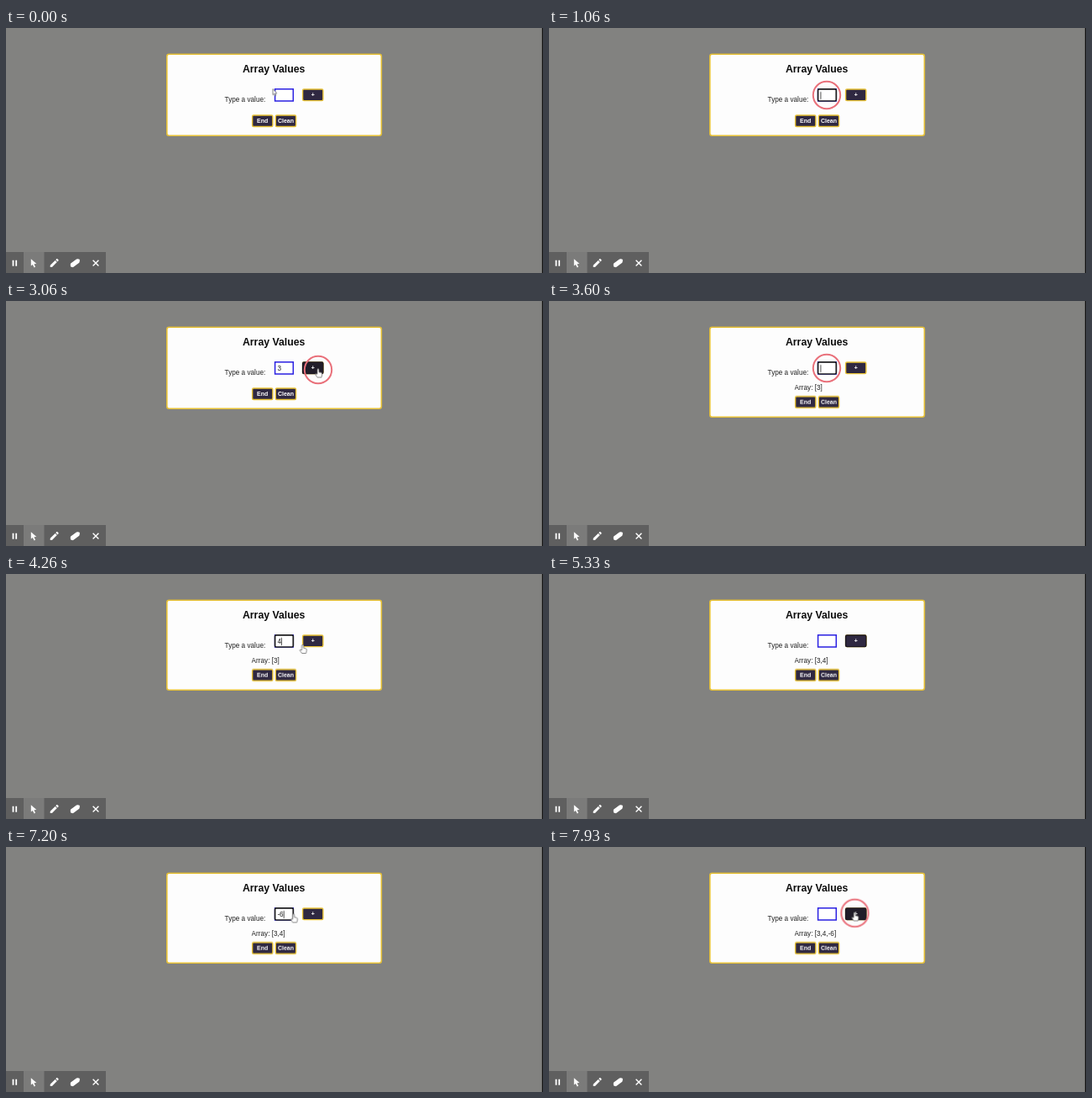
An HTML page that plays this animation: 640 px wide and 292 px high, repeating every 8 s.

```html
<!DOCTYPE html>
<html lang="en">
<head>
<meta charset="utf-8">
<title>Array Values</title>
<style>
  html, body { margin: 0; width: 100%; height: 100%; overflow: hidden; background: #828280; }
  svg { display: block; width: 640px; height: 292px; font: 8.2px "Liberation Sans", Arial, sans-serif; fill: #222; }
  .title { font-size: 12.3px; font-weight: bold; fill: #0c0c0c; text-anchor: middle; }
  .panel { fill: #fdfdfd; stroke: #e7c136; stroke-width: 1.6; height: 97px; }
  .btn rect { fill: #2f2841; stroke: #e7c136; stroke-width: 1.4; }
  .btn text { font-size: 7px; font-weight: bold; fill: #fff; text-anchor: middle; }
  .btn .focus { stroke: #1c1820; }
  .btn .hover { fill: #211d29; stroke: none; }
  .input { fill: #fff; stroke: #2a20e2; stroke-width: 1.5; }
  .input.active { stroke: #1d1d1f; stroke-width: 1.7; }
  .pointer path { fill: #fff; stroke: #626262; stroke-width: .75; stroke-linejoin: round; }
  .ring { fill: none; stroke: #e9707a; stroke-width: 2; }

  /* every timeline shares one 8 s clock; 1% = 80 ms */
  .step, .path { animation: var(--k) 8s infinite step-end; }
  .path { animation-timing-function: ease-in-out; }
  .off { opacity: 0; }

  @keyframes grow { 0% { height: 97px } 39.1%, 100% { height: 107px } }
  @keyframes drop { 0% { transform: none } 39.1%, 100% { transform: translateY(9.7px) } }

  @keyframes list1 { 0%, 59% { opacity: 0 } 39.1% { opacity: 1 } }
  @keyframes list2 { 0%, 98.6% { opacity: 0 } 59% { opacity: 1 } }
  @keyframes list3 { 0% { opacity: 0 } 98.6%, 100% { opacity: 1 } }

  @keyframes type3 { 0%, 39.1% { opacity: 0 } 30.75% { opacity: 1 } }
  @keyframes type4 { 0%, 59% { opacity: 0 } 50.75% { opacity: 1 } }
  @keyframes typeMinus { 0%, 98.6% { opacity: 0 } 81.25% { opacity: 1 } }
  @keyframes type6 { 0%, 98.6% { opacity: 0 } 86% { opacity: 1 } }

  @keyframes inputFocus {
    0%, 37.5%, 57.5%, 97.5% { opacity: 0 }
    11.25%, 45%, 69.2% { opacity: 1 }
  }
  @keyframes btnFocus {
    0%, 45%, 69.2% { opacity: 0 }
    37.5%, 57.5%, 97.5%, 100% { opacity: 1 }
  }
  @keyframes btnHover {
    0%, 41%, 61.5% { opacity: 0 }
    35.5%, 55%, 92%, 100% { opacity: 1 }
  }
  @keyframes caret {
    0%, 17.5%, 37%, 57%, 75.4%, 92.25% { opacity: 0; transform: none }
    11.25%, 23.75%, 45%, 69.2% { opacity: 1; transform: none }
    30.75%, 50.75% { opacity: 1; transform: translateX(4.6px) }
    81.25% { opacity: 1; transform: translateX(2.7px) }
    86% { opacity: 1; transform: translateX(7.3px) }
  }

  @keyframes move {
    0% { transform: translate(318px, 72.5px) }
    6%, 13% { transform: translate(331px, 80px) }
    20.5%, 32% { transform: translate(411.5px, 60px) }
    36.5%, 40% { transform: translate(372px, 80.5px) }
    43.5%, 49.5% { transform: translate(336px, 83px) }
    53.25% { transform: translate(353.5px, 84px) }
    56.5%, 60% { transform: translate(365px, 80px) }
    64.5%, 88% { transform: translate(336px, 80px) }
    94%, 100% { transform: translate(364.2px, 77.5px) }
  }
  @keyframes arrow { 0%, 15.5% { opacity: 1 } 3.5%, 35% { opacity: 0 } }
  @keyframes hand {
    0%, 42.5%, 63% { opacity: 0 }
    35%, 51.5%, 90%, 100% { opacity: 1 }
  }
  @keyframes ring {
    0%, 14.4%, 40.7%, 48.2%, 60.7%, 72.4% { opacity: 0 }
    11.25%, 45%, 69.2% { opacity: 1; transform: translate(331px, 80px) }
    37.5% { opacity: 1; transform: translate(372px, 82px) }
    57.5% { opacity: 1; transform: translate(365px, 80px) }
    97.5%, 100% { opacity: 1; transform: translate(364.5px, 78.7px) }
  }
</style>
</head>
<body>
<svg viewBox="0 0 640 292">
  <rect x="638.8" width="1.2" height="292" fill="#111"/>

  <rect class="panel step" style="--k:grow" x="191.8" y="31.3" width="255.6" rx="2.5"/>
  <text class="title" x="319.2" y="53">Array Values</text>
  <text x="260.6" y="88">Type a value:</text>

  <rect class="input" x="320.6" y="72.8" width="21.7" height="14.2"/>
  <rect class="input active step off" style="--k:inputFocus" x="320.6" y="72.8" width="21.7" height="14.2" rx="1.5"/>
  <g transform="translate(323.4 83.3)">
    <text class="step off" style="--k:type3">3</text>
    <text class="step off" style="--k:type4">4</text>
    <text class="step off" style="--k:typeMinus">-</text>
    <text class="step off" style="--k:type6" x="2.7">6</text>
    <rect class="step off" style="--k:caret" y="-7.3" width=".8" height="9"/>
  </g>

  <g class="btn">
    <rect x="353.6" y="73" width="24.3" height="13.6" rx="1.5"/>
    <rect class="focus step off" style="--k:btnFocus" x="353.6" y="73" width="24.3" height="13.6" rx="1.5"/>
    <rect class="hover step off" style="--k:btnHover" x="354.2" y="73.6" width="23.1" height="12.4"/>
    <text x="365.9" y="82">+</text>
  </g>

  <g transform="translate(292.6 105.8)">
    <text class="step off" style="--k:list1">Array: [3]</text>
    <text class="step off" style="--k:list2">Array: [3,4]</text>
    <text class="step off" style="--k:list3">Array: [3,4,-6]</text>
  </g>

  <g class="btn step" style="--k:drop">
    <rect x="293.6" y="104" width="24.3" height="13.5" rx="1.5"/>
    <text x="305.6" y="113.2">End</text>
    <rect x="321.3" y="104" width="24.3" height="13.5" rx="1.5"/>
    <text x="333.5" y="113.2">Clean</text>
  </g>

  <g class="toolbar">
    <rect y="267" width="119" height="25" fill="#5f5f5f"/>
    <rect x="21" y="267" width="24.5" height="25" fill="#7b7b7a"/>
    <g fill="#fff">
      <path d="M7.6 276.8h1.8v7h-1.8zM11.3 276.8h1.8v7h-1.8z"/>
      <path d="M29.8 275.3V283.6L31.8 282L33.6 285.5L35 284.8L33.4 281.3L36.3 281Z"/>
      <path d="M52.7 285V282.8L58.6 276.9L60.8 279.1L54.9 285ZM59.3 276.2L60.4 275.1Q60.9 274.8 61.4 275.2L62.5 276.3Q62.8 276.8 62.5 277.3L61.5 278.4Z"/>
      <path d="M77.2 280.6L84 275.6Q84.6 275.2 85.4 275.3L87 275.5Q88 275.8 87.9 276.8L87.6 279Q87.5 279.7 86.9 280.1L80.5 284.8Q79.8 285.3 79 285.1L77.7 284.8Q76.9 284.5 76.9 283.6L76.8 281.5Z"/>
    </g>
    <path d="M103.6 276.8l6.8 6.8m0-6.8l-6.8 6.8" stroke="#fff" stroke-width="1.4"/>
  </g>

  <circle class="ring step off" style="--k:ring" r="16.2"/>
  <g class="pointer path" style="--k:move">
    <path class="step" style="--k:arrow" d="M0 0V7.2L1.6 5.8L2.7 8.3L3.8 7.8L2.7 5.4L4.8 5.2Z"/>
    <path class="step off" style="--k:hand" d="M-1 1Q0-.8 1 1V4.2L4 5Q5 5.3 4.8 7L4 10.5H-1L-3.3 7Q-3.6 5.6-1 6.6Z"/>
  </g>
</svg>
</body>
</html>
```
